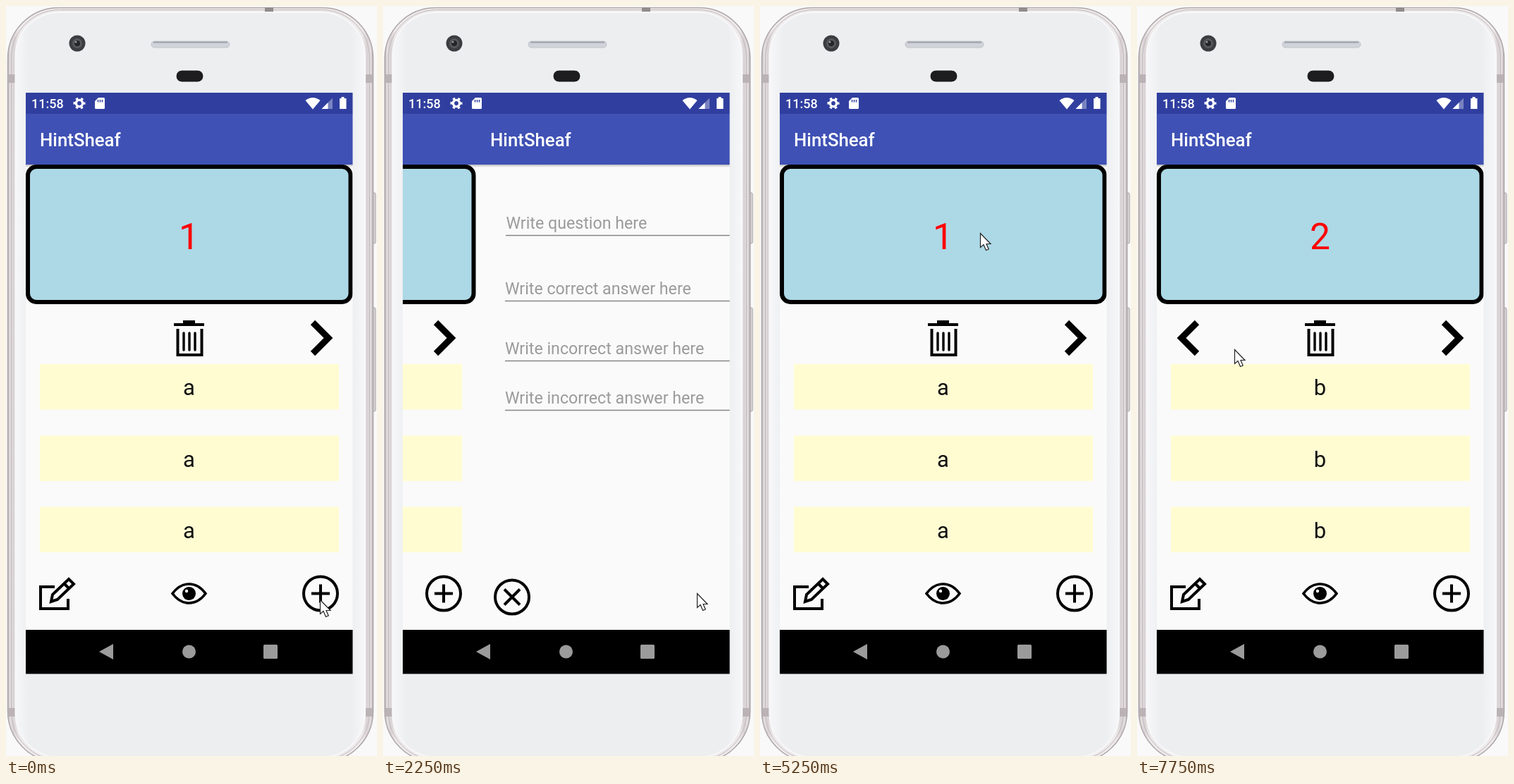
Recreate the animation shown at these times as an HTML page. Size 526 by 1064 pixels, loop 8000 ms.

```html
<!DOCTYPE html>
<html lang="en">
<head>
<meta charset="utf-8">
<title>Study cards</title>
<style>
html, body { margin: 0; width: 100%; height: 100%; overflow: hidden; background: #f9f9f9; }
svg { display: block; }
text { font-family: Roboto, "Noto Sans", sans-serif; }
.bar { font-weight: 500; fill: #fff; }
.line { fill: none; stroke: #000; stroke-width: 4; }
.chevron { fill: none; stroke: #000; stroke-width: 9; }
.mid { text-anchor: middle; }
.answer { font-size: 31px; fill: #111; }
.hint { font-size: 23.2px; fill: #9b9b9b; }
</style>
</head>
<body>
<svg width="526" height="1064" viewBox="0 0 526 1064">
  <defs>
    <linearGradient id="rim">
      <stop offset="0" stop-color="#b5adaf"/><stop offset=".006" stop-color="#e4dfe0"/>
      <stop offset=".016" stop-color="#d9d2d4"/><stop offset=".03" stop-color="#eeeaeb"/>
      <stop offset=".97" stop-color="#eeeaeb"/><stop offset=".984" stop-color="#d9d2d4"/>
      <stop offset=".994" stop-color="#e4dfe0"/><stop offset="1" stop-color="#b5adaf"/>
    </linearGradient>
    <linearGradient id="face">
      <stop offset="0" stop-color="#f7f7f8"/><stop offset=".04" stop-color="#eceef0"/>
      <stop offset=".96" stop-color="#eceef0"/><stop offset="1" stop-color="#f7f7f8"/>
    </linearGradient>
    <linearGradient id="shade" x2="0" y2="1">
      <stop offset="0" stop-color="#bbb"/><stop offset="1" stop-color="#fafafa"/>
    </linearGradient>
    <clipPath id="screen"><rect x="28" y="153" width="463.5" height="732"/></clipPath>
    <g id="page">
      <rect x="28" y="153" width="464" height="732" fill="#fafafa"/>
      <rect x="28" y="225" width="464" height="4" fill="url(#shade)"/>
      <rect x="28" y="153" width="464" height="72" fill="#3f51b5"/>
      <text class="bar" x="48" y="199" font-size="25.8">HintSheaf</text>
    </g>
  </defs>

  <!-- phone body -->
  <g fill="#d8d2d4" stroke="#aaa3a5">
    <rect x="518" y="265" width="6" height="72" rx="2"/>
    <rect x="518" y="428" width="6" height="147" rx="2"/>
  </g>
  <rect x="2.5" y="2.5" width="518" height="1070" rx="72" fill="url(#rim)" stroke="#aea6a8" stroke-width="1.5"/>
  <rect x="7.5" y="5.5" width="508" height="1064" rx="68" fill="none" stroke="#c0b8ba"/>
  <path d="M3 97h10v12h-10zM510 97h10v12h-10zM3 996h10v12h-10zM510 996h10v12h-10z" fill="#bab2b4"/>
  <rect x="367" y="2" width="12" height="6" fill="#928b8d"/>
  <rect x="13.5" y="9" width="495.5" height="1057" rx="62" fill="url(#face)" stroke="#f8f8f9" stroke-width="2"/>
  <circle cx="101" cy="53" r="11.5" fill="#3c3d40"/>
  <circle cx="101" cy="53" r="7" fill="#56585c"/>
  <circle cx="101" cy="53" r="4" fill="#242528"/>
  <circle cx="99" cy="51" r="1.5" fill="#999"/>
  <rect x="206" y="50" width="111" height="9" rx="4.5" fill="#d0d4da" stroke="#c0c3c9"/>
  <path d="M209 51.5H314" stroke="#9da2aa" stroke-width="2"/>
  <rect x="241" y="91" width="39" height="17" rx="8.5" fill="#1d1d20" stroke="#fafafa"/>

  <!-- system bars -->
  <rect x="28" y="123" width="463.5" height="30.5" fill="#303f9f"/>
  <text class="bar" x="36" y="145" font-size="18">11:58</text>
  <g fill="#fff">
    <circle cx="104" cy="138" r="4.6" fill="none" stroke="#fff" stroke-width="3.4"/>
    <circle cx="104" cy="138" r="7" fill="none" stroke="#fff" stroke-width="3" stroke-dasharray="3.4 3.93" stroke-dashoffset="1.7"/>
    <path d="M131 130h7.5q1.5 0 1.5 1.5v13q0 1.5-1.5 1.5h-11q-1.5 0-1.5-1.5v-9.500z"/>
    <path d="M130.500 133v3.500M133.500 133v3.500M136.500 133v3.500" stroke="#303f9f" stroke-width="1.5"/>
    <path d="M424.500 134Q435 126 445.500 134L435 146.500z"/>
    <path d="M463 130.500V146H447.500z" opacity=".35"/><path d="M456.500 137V146H447.500z"/>
    <path d="M475.500 131v-2h4v2h3v15h-9.500v-15z"/>
  </g>
  <rect x="28" y="885" width="463.5" height="62.500" fill="#000"/>
  <g fill="#9b9b9b">
    <path d="M132 916l20-11v22z"/><circle cx="259.500" cy="916" r="9.5"/>
    <rect x="365" y="906" width="20" height="20" rx="1.5"/>
  </g>

  <g clip-path="url(#screen)">
    <g id="deck">
      <use href="#page"/>
      <g id="card">
        <rect x="31" y="228" width="457.500" height="192" rx="12" fill="#add8e6" stroke="#000" stroke-width="6"/>
        <text id="question" class="mid" x="259.500" y="345" font-size="51.600" fill="#f00"></text>
      </g>
      <g id="answers"></g>
      <path class="chevron" d="M435 449l22 22l-22 22"/>
      <path id="back" class="chevron" d="M85 449l-22 22l22 22"/>
      <path class="line" d="M238 452H281M251 448H268" stroke-width="5"/>
      <path class="line" d="M243.500 458V495H277.500V458"/>
      <path class="line" d="M252 464V488M260 464V488M268 464V488" style="stroke-width:3.4" stroke-linecap="round"/>
      <path class="line" d="M69 824H49V855H88V841M64 845L66 835L89 813L96 820L73 842zM82 819L90 827"/>
      <path class="line" d="M236 833.500Q246 820 259.500 820T283 833.500Q273 847 259.500 847T236 833.500z" style="stroke-width:3.6"/>
      <circle cx="259.500" cy="833.500" r="9.500"/><circle cx="256" cy="830" r="2.200" fill="#fafafa"/>
      <circle class="line" cx="446" cy="833.500" r="24"/>
      <path class="line" d="M433 833.500H459M446 820.500V846.500"/>
    </g>
    <g id="form">
      <use href="#page"/>
      <g id="fields"></g>
      <circle class="line" cx="79" cy="838.500" r="24"/>
      <path class="line" d="M68 827.500l22 22M90 827.500l-22 22"/>
      <path d="M411.500 813H454L463 822V865H411.500z"/>
      <path d="M421 817h31v15h-31zM417.500 841h40v20h-40z" fill="#fafafa"/>
      <rect x="443.500" y="819.500" width="5.500" height="10.500"/>
    </g>
  </g>
  <path id="cursor" d="M.5.5V20.500L5 16.500L8.500 24.500L12.200 23L9 15.500H15z" fill="#fff" stroke="#222" stroke-width="1.200"/>
</svg>
<script>
const LOOP = 8000, TICK = 250, WIDTH = 464, SLIDE = 500;
const $ = id => document.getElementById(id);

$("answers").innerHTML = [508, 609.5, 710.5].map(y =>
  `<rect x="48" y="${y}" width="424" height="64.5" fill="#fffcd2"/>
   <text class="mid answer" x="259.5" y="${y + 44}"></text>`).join("");
$("fields").innerHTML = [
  [325, "question"], [418, "correct answer"], [503, "incorrect answer"], [573, "incorrect answer"]
].map(([y, what], i) =>
  `<text class="hint" x="${i ? 69 : 70.5}" y="${y - 9}">Write ${what} here</text>
   <path d="M${i ? 69 : 70} ${y + .5}H${i ? 449 : 448}" stroke="#858585" stroke-width="1.3"/>`).join("");

// time, x, y of the pointer
const stops = [
  [0, 445, 842], [250, 445, 833], [2750, 151, 829], [3000, 100, 833], [3250, 91, 836],
  [5000, 388, 249], [5250, 312, 322], [5750, 399, 432], [6000, 438, 463],
  [6250, 441, 465], [7750, 138, 487]
];

function slide(t, start) {
  const f = Math.min(1, Math.max(0, (t - start) / SLIDE));
  return WIDTH * (1 - Math.cos(Math.PI * f)) / 2;
}
function move(id, x, y = 0) {
  $(id).setAttribute("transform", `translate(${x} ${y})`);
}
// leave to the left, then come in from the right
function swap(t, start) {
  return t < start + SLIDE ? -slide(t, start) : WIDTH - slide(t, start + SLIDE);
}

function draw(now) {
  const t = Math.floor(now % LOOP / TICK) * TICK;
  const shift = slide(t, 1907) - slide(t, 4210);
  move("deck", -shift);
  move("form", WIDTH - shift);
  move("card", swap(t, 6550));
  move("answers", swap(t, 6531));
  const second = t > 7050;
  $("question").textContent = second ? "2" : "1";
  document.querySelectorAll(".answer").forEach(a => a.textContent = second ? "b" : "a");
  $("back").style.display = t < 6750 ? "none" : "";
  const [, x, y] = stops.filter(s => s[0] <= t).pop();
  move("cursor", x, y);
  requestAnimationFrame(draw);
}
requestAnimationFrame(draw);
</script>
</body>
</html>
```
